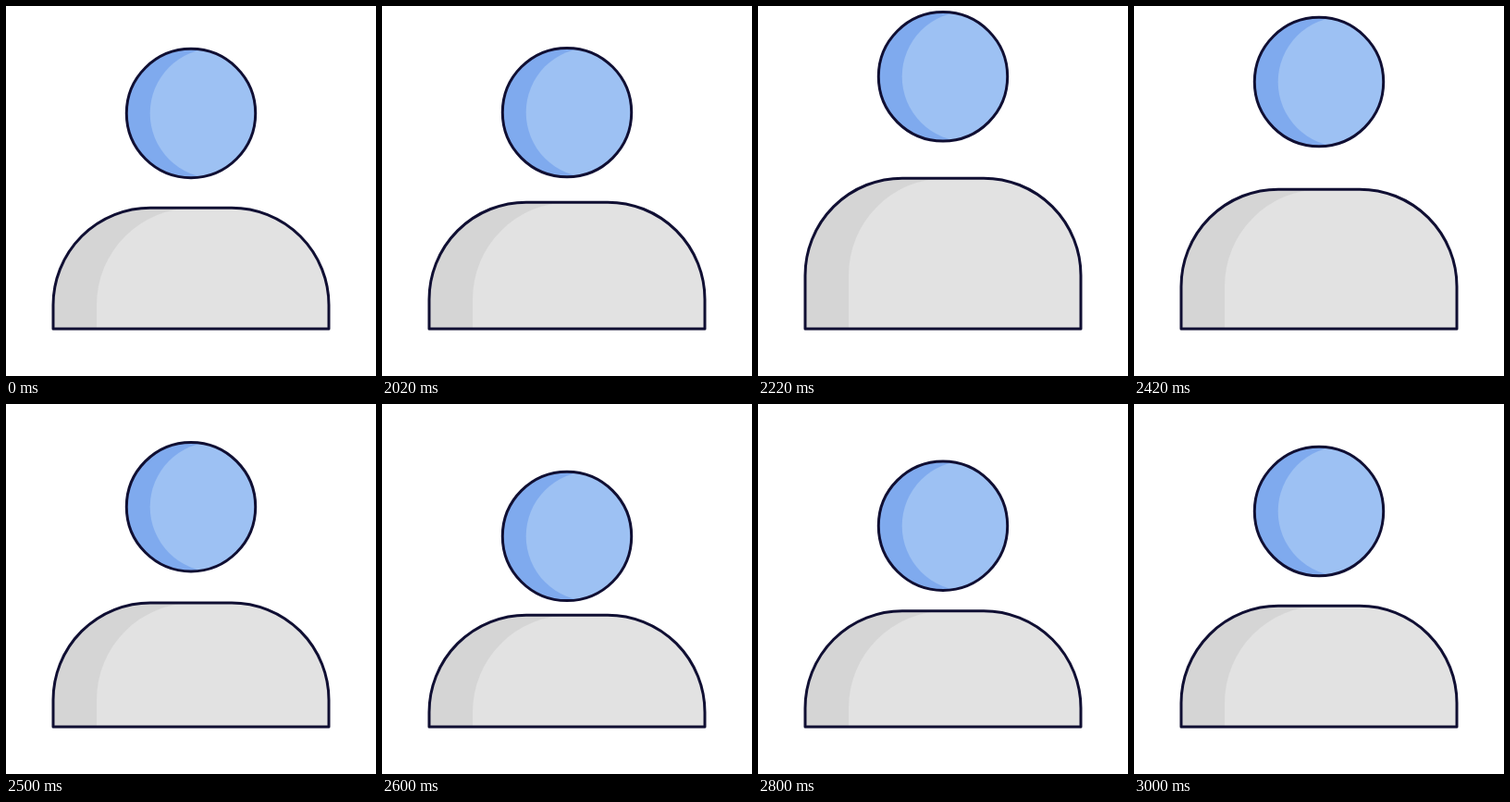
Animation, 400 px wide and 400 px high, one loop 3020 ms. Source, as an HTML page:

```html
<!DOCTYPE html>
<html lang="en">
<head>
<meta charset="utf-8">
<title>Person icon</title>
<style>
  html, body { margin: 0; width: 100%; height: 100%; overflow: hidden; background: #fff; }
  svg { display: block; width: 100vw; height: 100vh; }
  .line { fill: none; stroke: #100f33; stroke-width: 3; stroke-linejoin: round; }
</style>
</head>
<body>
<svg viewBox="0 0 400 400">
  <defs>
    <clipPath id="headClip"><circle cx="200" cy="116" r="69.7"/></clipPath>
    <clipPath id="bodyClip"><path class="torso"/></clipPath>
  </defs>
  <g id="head">
    <circle cx="200" cy="116" r="69.7" fill="#7faaee"/>
    <circle cx="226" cy="116" r="70.3" fill="#9dc1f3" clip-path="url(#headClip)"/>
    <circle class="line" cx="200" cy="116" r="69.7"/>
  </g>
  <path class="torso" fill="#d5d5d5"/>
  <g clip-path="url(#bodyClip)"><path class="torso" fill="#e2e2e2" transform="translate(47 0)"/></g>
  <path class="torso line"/>
</svg>
<script>
  const LOOP = 3020;
  const head = document.getElementById('head');
  const torsos = document.querySelectorAll('.torso');

  const inOut = p => (1 - Math.cos(Math.PI * p)) / 2;
  const out = p => 1 - (1 - p) ** 2;

  // Each move: start, end, from, to, easing
  const headMoves = [
    [2000, 2265, 0, -42, inOut],
    [2370, 2620, -42, 28, inOut],
    [2620, 3010, 28, 0, inOut]
  ];
  const bodyMoves = [
    [2000, 2250, 0, -32.5, out],
    [2320, 2610, -32.5, 10, inOut],
    [2610, 3010, 10, 0, inOut]
  ];

  function offset(moves, t) {
    let y = 0;
    for (const [start, end, from, to, ease] of moves) {
      if (t < start) break;
      y = from + (to - from) * ease(Math.min(1, (t - start) / (end - start)));
    }
    return y;
  }

  // Poses change 40 times a second, in alternating 20 and 30 ms steps
  const snap = t => Math.floor(t / 50) * 50 + (t % 50 >= 20 ? 25 : 0);

  function torsoPath(dy) {
    const top = 218.3 + dy, side = top + 105;
    return `M51 349V${side}A105 105 0 0 1 156 ${top}H244A105 105 0 0 1 349 ${side}V349Z`;
  }

  function draw(t) {
    const pose = snap(t);
    head.setAttribute('transform', `translate(0 ${offset(headMoves, pose)})`);
    const d = torsoPath(offset(bodyMoves, pose));
    torsos.forEach(el => el.setAttribute('d', d));
  }

  const begin = performance.now();
  function tick() {
    draw((performance.now() - begin) % LOOP);
    requestAnimationFrame(tick);
  }
  tick();
</script>
</body>
</html>
```
